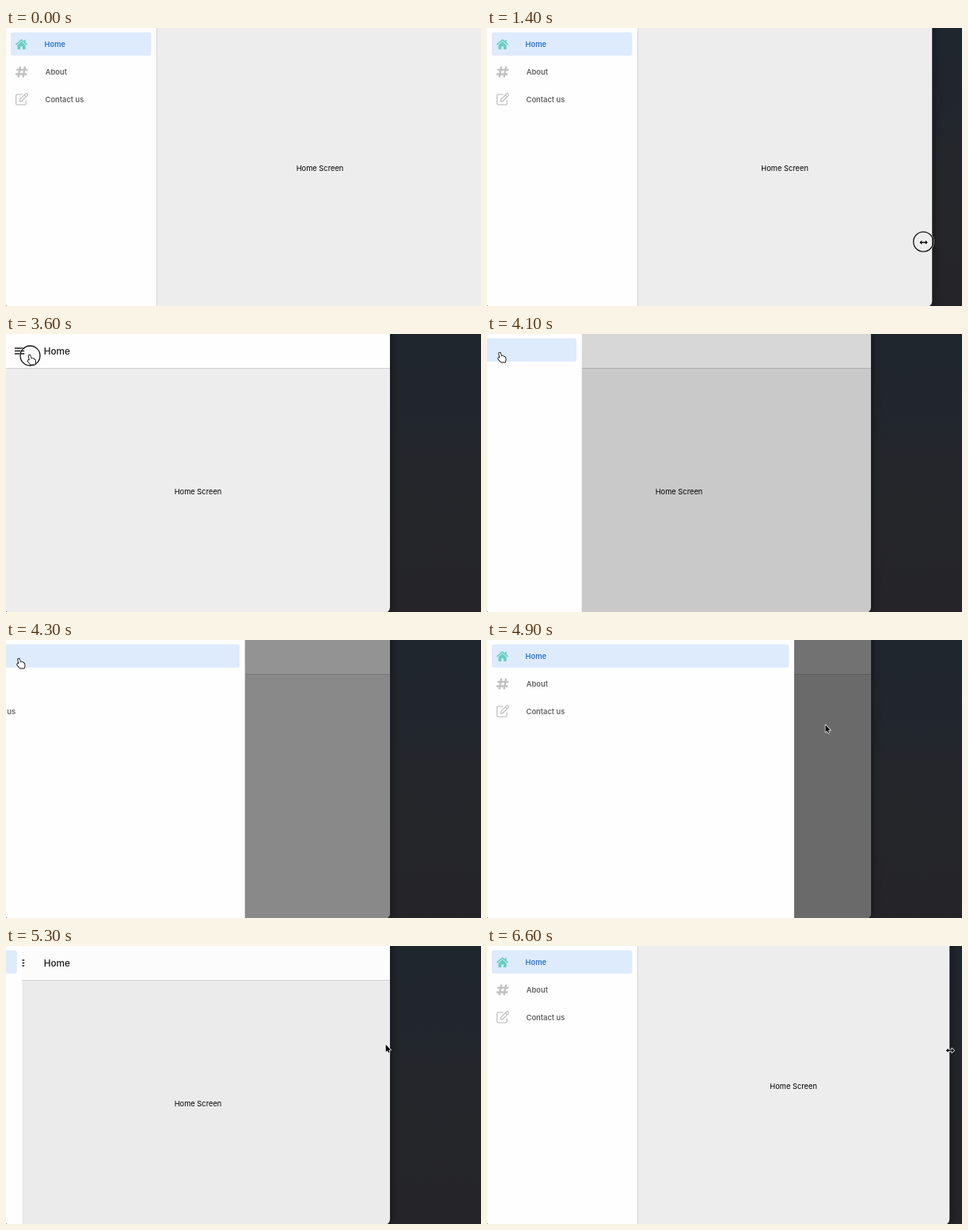
Animation of 600 by 352 pixels, one loop 7300 ms. Source, as an HTML page:

```html
<!DOCTYPE html>
<html lang="en">
<head>
<meta charset="utf-8">
<title>Responsive drawer</title>
<style>
  html, body { margin: 0; width: 100%; height: 100%; overflow: hidden; background: #232529; }
  svg { display: block; width: 100vw; height: 100vh; }
  text { font: 400 9.3px Inter, "Open Sans", sans-serif; }
  .label { font-weight: 600; fill: #626265; }
  .active { fill: #2a72cd; }
  .title { font-size: 11.8px; font-weight: 500; fill: #1c1c1e; }
  .line { fill: none; stroke: #c2c2c2; }
</style>
</head>
<body>
<svg viewBox="0 0 600 352">
  <defs>
    <linearGradient id="wall" x1="0" y1="0" x2="0" y2="1">
      <stop offset="0" stop-color="#20262e"/>
      <stop offset=".35" stop-color="#22262d"/>
      <stop offset=".5" stop-color="#25262b"/>
      <stop offset="1" stop-color="#252529"/>
    </linearGradient>
    <filter id="soft" x="-10%" y="-10%" width="120%" height="120%">
      <feGaussianBlur stdDeviation="6"/>
    </filter>
    <clipPath id="clip"><rect class="frame" x="-2" y="-20" height="373" rx="7"/></clipPath>
  </defs>

  <rect width="600" height="352" fill="url(#wall)"/>
  <rect class="frame" x="-2" y="-20" height="373" rx="7" opacity=".6" filter="url(#soft)"/>

  <g clip-path="url(#clip)">
    <rect x="-2" width="620" height="354" fill="#eeedee"/>
    <text id="screen" text-anchor="middle">Home Screen</text>

    <g id="header">
      <rect x="-2" width="620" height="43" fill="#fefefe"/>
      <rect x="-2" y="43" width="620" height="1" fill="#d0d0d2"/>
      <path d="M11 18.1H23.2M11 21.6H23.2M11 25.1H23.2" stroke="#1c1c1e" stroke-width="1.5"/>
      <text class="title" x="47.7" y="26">Home</text>
    </g>

    <rect id="shade" x="-2" y="-2" width="620" height="358"/>

    <g id="drawer">
      <rect id="panel" x="-4" height="354" fill="#fefefe"/>
      <rect id="divider" x="190" width="1" height="354" fill="#d3d3d5"/>
      <rect id="item" x="6" y="5.5" height="29.5" rx="3" fill="#deebfc"/>
      <g fill="#66cec2">
        <path d="M12.4 21.2L19.5 15.1L26.6 21.2" fill="none" stroke="#66cec2" stroke-width="1.6"/>
        <path d="M22.8 15H24.6V19.4L22.8 17.8ZM14.4 21.7L19.5 17.3L24.6 21.7V27H20.9V23.2H18.1V27H14.4Z"/>
      </g>
      <path class="line" stroke-width="2.5" d="M18.1 48.8L15.5 62.4M24.1 48.8L21.5 62.4M13.2 53H27.4M12 58.6H26.2"/>
      <path class="line" stroke-width="1.3" stroke-linejoin="round"
        d="M20.6 84.2H14Q12.7 84.2 12.7 85.5V95.8Q12.7 97.1 14 97.1H23.9Q25.2 97.1 25.2 95.8V91.4M17.3 93L17.8 90.1L24.8 83.1Q25.6 82.4 26.4 83.1L27.1 83.9Q27.8 84.7 27.1 85.4L20.1 92.5ZM23.2 84.8L25.4 87"/>
      <text class="label active" x="48.6" y="24">Home</text>
      <text class="label" x="49.8" y="59">About</text>
      <text class="label" x="49.6" y="93.7">Contact us</text>
    </g>
  </g>
  <rect class="frame" x="-2" y="-20" height="373" rx="7" fill="none" stroke="#aaa" stroke-opacity=".2" stroke-width=".6"/>

  <g id="cursor">
    <g id="ring" fill="none">
      <circle r="13" stroke="#fff" stroke-opacity=".65" stroke-width="1.4"/>
      <circle r="12.5" stroke="#111" stroke-width="1.3"/>
    </g>
    <g stroke-linejoin="round" paint-order="stroke">
      <path id="resize" stroke="#fff" stroke-width="1.5"
        d="M-4.8 .8L-1.9 -1.9V0H2.7V-1.9L5.6 .8L2.7 3.5V1.6H-1.9V3.5Z"/>
      <path id="arrow" stroke="#fff" stroke-width="1.4"
        d="M.5 .5V9.8L2.6 7.9L4 11L5.4 10.4L4 7.3H7Z"/>
      <path id="hand" fill="#fff" stroke="#111" stroke-width="1.8"
        d="M-1.8 .5C-2.2 -.8 -.4 -1.2 0 0L1.4 3.8L3.2 3.6L4.8 4.2L6.2 5.4L6.6 8L5.9 11H.7L-1.2 9L-2.9 6.6C-3.1 5.4 -1.8 5.1 -.6 6.1Z"/>
    </g>
  </g>
</svg>

<script>
const LOOP = 7300, TICK = 100, SIDE = 190, BREAK = 508;
const FULL = 603, SMALL = 485, LARGE = 584.2;

// Pointer trips: from ms, to ms, end x, end y
const trips = [
  [600, 900, 601.5, 268.5],
  [1000, 2400, 485.5, 280],
  [2700, 2900, 93.5, 57.5],
  [3000, 3400, 25.5, 23.5],
  [3500, 3600, 30.5, 27.5],
  [3700, 4000, 17, 24.5],
  [4500, 4900, 427, 107],
  [5000, 5440, 486.5, 129.5],
  [6000, 6300, 584.5, 131.5]
];
const presses = [[900, 2600], [3400, 3800], [5100, 5200], [5900, 6600]];

const glide = k => Math.sin(k * Math.PI / 2);
const swing = k => (1 - Math.cos(k * Math.PI)) / 2;
const settle = k => 1 - (1 - k) ** 3;
const part = (t, from, to, ease) => ease(Math.min(1, Math.max(0, (t - from) / (to - from))));

const el = id => document.getElementById(id);
const frames = document.querySelectorAll(".frame");
const set = (id, attrs) => {
  for (const key in attrs) el(id).setAttribute(key, attrs[key]);
};
const show = (id, on) => set(id, { visibility: on ? "visible" : "hidden" });

// The window edge trails the pointer a little
const windowWidth = t =>
  FULL + (SMALL - FULL) * part(t, 1110, 2400, glide) + (LARGE - SMALL) * part(t, 6020, 6300, glide);

const drawerOut = t => part(t, 3860, 4500, swing) - part(t, 5000, 5480, settle);

// Each trip bends: y lags behind x
function pointerAt(t) {
  let x = 600, y = 266;
  for (const [from, to, endX, endY] of trips) {
    const k = part(t, from, to, glide);
    x += (endX - x) * k;
    y += (endY - y) * k * k;
  }
  return [x, y];
}

function drawPointer(t, width) {
  const [x, y] = pointerAt(t);
  const pressed = presses.some(([from, to]) => t >= from && t < to);
  const onEdge = Math.abs(x - width) < (pressed ? 20 : 5);
  const onButton = x < 45 && y < 40;
  const shape = onEdge ? "resize" : onButton ? "hand" : "arrow";

  set("cursor", { transform: `translate(${x} ${y})` });
  for (const id of ["resize", "arrow", "hand"]) show(id, t >= 600 && id === shape);
  show("ring", pressed);
}

function draw(t) {
  const width = windowWidth(t);
  const out = drawerOut(t);
  const wide = width > BREAK;
  const panel = wide ? SIDE : width * .8;

  frames.forEach(f => f.setAttribute("width", width + 2));
  set("screen", { x: wide ? (SIDE + width) / 2 : width / 2, y: wide ? 181.2 : 203.2 });
  show("header", !wide);
  show("divider", wide);
  show("drawer", wide || out > 0);
  set("panel", { width: panel + 4 });
  set("item", { width: panel - 12.6 });
  set("drawer", { transform: `translate(${wide ? 0 : panel * (out - 1)} 0)` });
  set("shade", { opacity: wide ? 0 : .55 * Math.max(0, (out - .04) / .96) });
  drawPointer(t, width);
}

const start = performance.now();
function loop() {
  const t = (performance.now() - start) % LOOP;
  draw(Math.floor(t / TICK) * TICK);
  requestAnimationFrame(loop);
}
loop();
</script>
</body>
</html>
```
